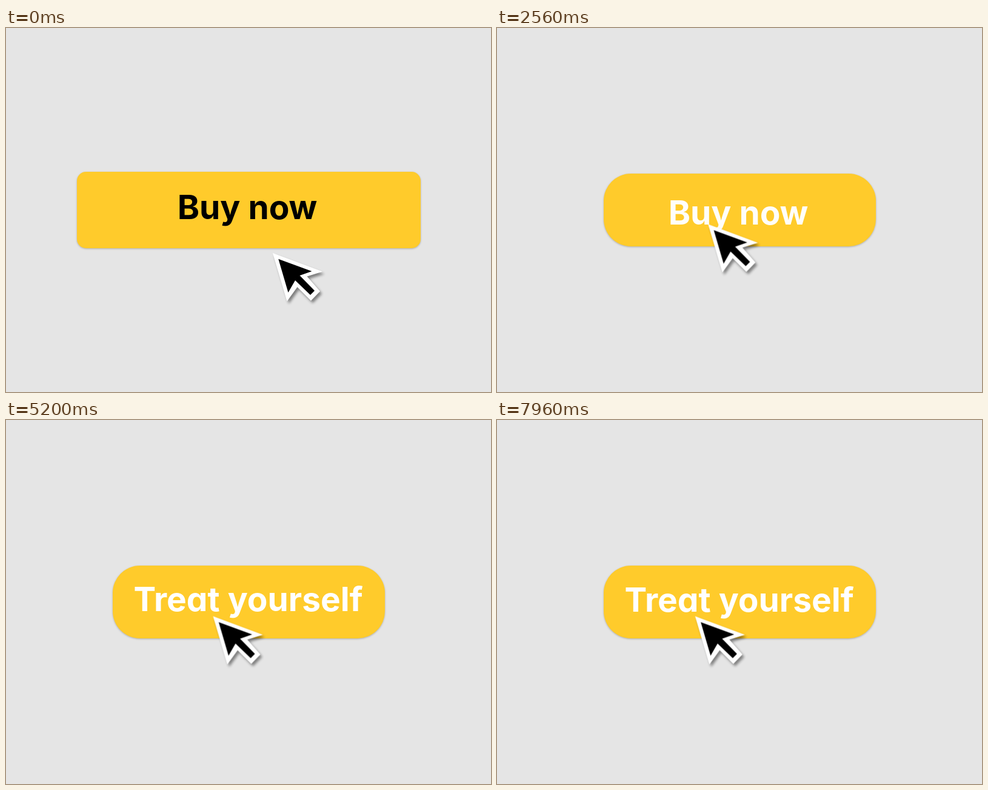
An HTML page for the animation above (8 s loop, 800 by 600 pixels).

```html
<!DOCTYPE html>
<html lang="en">
<head>
<meta charset="utf-8">
<title>Buy button</title>
<style>
  html, body { margin: 0; width: 100%; height: 100%; overflow: hidden; background: #e5e5e5; }
  .stage { position: relative; width: 800px; height: 600px; overflow: hidden; }
  .stage * { animation-duration: 8s; animation-iteration-count: infinite; animation-timing-function: linear; }
  svg, .button, .line { position: absolute; }
  svg { left: 0; top: 0; }

  .button {
    background: #ffcb2b;
    box-shadow: 0 1px 3px rgba(0, 0, 0, .25);
    animation-name: shrink;
  }
  @keyframes shrink {
    0%, 9.75% {
      left: 117px; top: 237px; width: 567px; height: 126px; border-radius: 15px;
      animation-timing-function: cubic-bezier(.25, 1, .5, 1);
    }
    21.5%, 100% { left: 175.5px; top: 240px; width: 449px; height: 120px; border-radius: 45px; }
  }

  .labels { clip-path: inset(237px 0); }
  text {
    font: 700 55px Inter, "Open Sans", sans-serif;
    font-feature-settings: "cv11" 1;
    text-anchor: middle;
  }
  .buy { animation-name: tint, buy-slide, buy-fade; }
  .treat { fill: #fff; animation-name: treat-slide, treat-fade; }
  @keyframes tint {
    0%, 9.75% { fill: #000; animation-timing-function: cubic-bezier(.25, 1, .5, 1); }
    21.5%, 100% { fill: #fff; }
  }
  @keyframes buy-slide {
    0%, 30% { transform: translateY(0); animation-timing-function: cubic-bezier(.333, 0, .667, .333); }
    35.5%, 100% { transform: translateY(68px); }
  }
  @keyframes buy-fade {
    0%, 30% { opacity: 1; animation-timing-function: cubic-bezier(.9, 0, 1, .3); }
    35.5%, 100% { opacity: 0; }
  }
  @keyframes treat-slide {
    0%, 35.5% { transform: translateY(-40px); animation-timing-function: cubic-bezier(.333, .667, .667, 1); }
    41.125%, 98.75% { transform: translateY(0); animation-timing-function: cubic-bezier(.333, 0, .667, .333); }
    100% { transform: translateY(3.5px); }
  }
  @keyframes treat-fade {
    0%, 35.5% { opacity: 0; animation-timing-function: cubic-bezier(.333, .667, .667, 1); }
    41.125%, 100% { opacity: 1; }
  }

  /* Outer box reveals the line from the left, inner box wipes it away. */
  .line { left: var(--x); top: 321.5px; width: var(--w); height: 6.5px; }
  .line i {
    display: block;
    height: 100%;
    background: linear-gradient(90deg, #fff var(--gap), transparent 0 var(--gap-end), #fff 0);
  }
  .buy-line { --x: 288px; --w: 225px; --gap: 65px; --gap-end: 96px; animation-name: buy-draw; }
  .buy-line i { animation-name: buy-wipe; }
  .treat-line { --x: 226px; --w: 352px; --gap: 142px; --gap-end: 168px; animation-name: treat-draw; }
  .treat-line i { animation-name: treat-wipe; }
  @keyframes buy-draw {
    0%, 9.75% { clip-path: inset(0 100% 0 0); animation-timing-function: cubic-bezier(.25, 1, .5, 1); }
    21.5%, 100% { clip-path: inset(0 0 0 0); }
  }
  @keyframes buy-wipe {
    0%, 17.5% { clip-path: inset(0 0 0 0); animation-timing-function: cubic-bezier(.455, .03, .515, .955); }
    31.25%, 100% { clip-path: inset(0 0 0 100%); }
  }
  @keyframes treat-draw {
    0%, 36.8% { clip-path: inset(0 100% 0 0); animation-timing-function: cubic-bezier(.25, 1, .5, 1); }
    48.5%, 100% { clip-path: inset(0 0 0 0); }
  }
  @keyframes treat-wipe {
    0%, 47% { clip-path: inset(0 0 0 0); animation-timing-function: cubic-bezier(.455, .03, .515, .955); }
    61.5%, 100% { clip-path: inset(0 0 0 100%); }
  }

  .cursor { filter: drop-shadow(3px 4px 2px rgba(0, 0, 0, .45)); animation-name: point; }
  @keyframes point {
    0%, 7% { transform: translate(440px, 371px); animation-timing-function: cubic-bezier(.3, 0, .1, 1); }
    15%, 28.75% { transform: translate(348.5px, 323.5px); animation-timing-function: cubic-bezier(.333, .055, .667, .433); }
    100% { transform: translate(326.5px, 323.5px); }
  }
</style>
</head>
<body>
<div class="stage">
  <div class="button"></div>
  <svg class="labels" width="800" height="600">
    <text class="buy" x="398" y="314.5">Buy now</text>
    <text class="treat" x="399.5" y="315">Treat yourself</text>
  </svg>
  <div class="line buy-line"><i></i></div>
  <div class="line treat-line"><i></i></div>
  <svg width="800" height="600">
    <g class="cursor">
      <path fill="#fff" d="M0 0 82 30.5 56.5 38.5 78 63 63 78.5 40.5 56 23.5 79.5Z"/>
      <path d="M9.3 9.7 64.5 30 44.5 37 69 62 62 69 37 45 25.5 65Z"/>
    </g>
  </svg>
</div>
</body>
</html>
```
